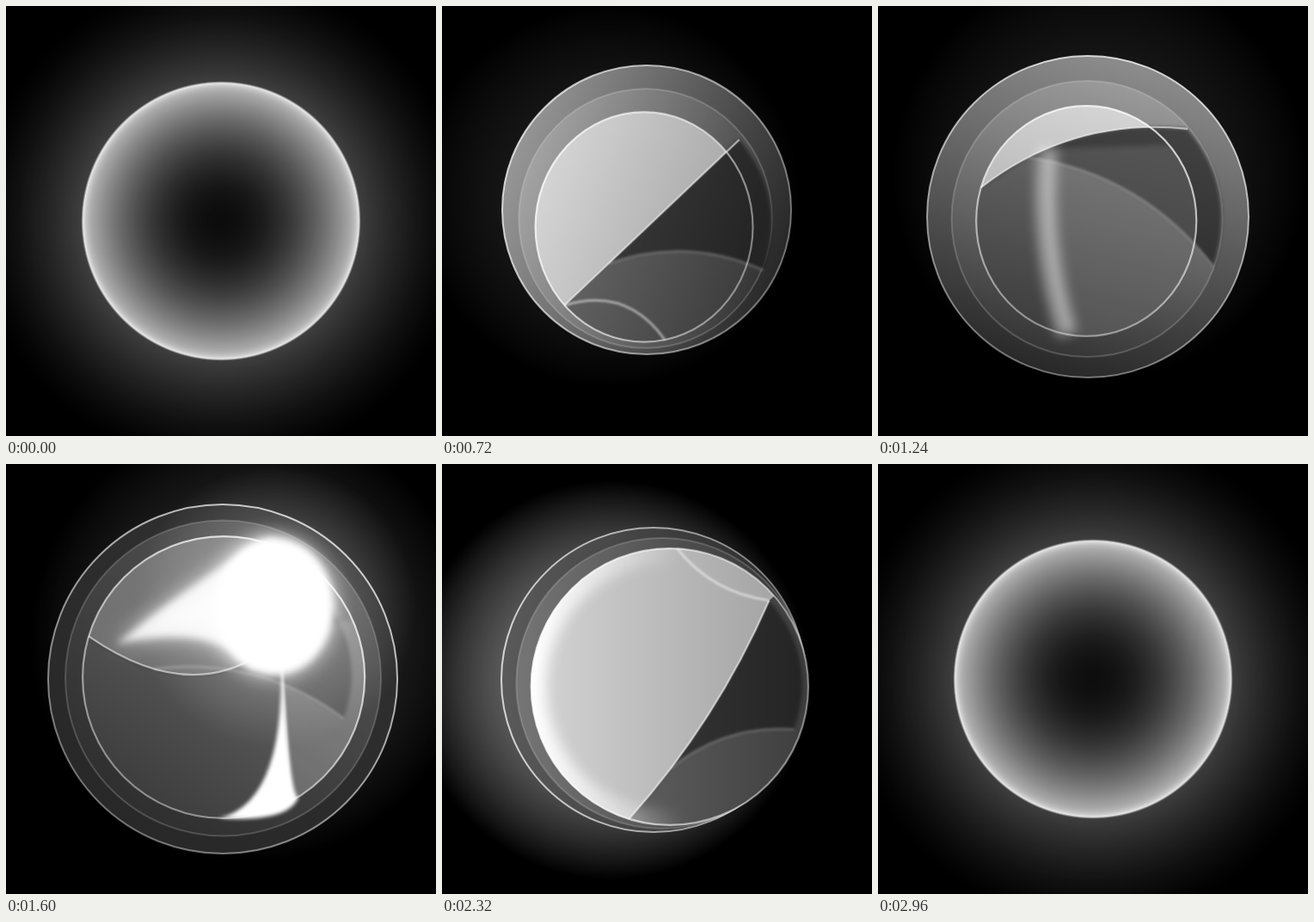
Recreate the animation shown at these times as an HTML page with a canvas. Size 500 by 500 pixels, loop 3 s.

```html
<!DOCTYPE html>
<html lang="en">
<head>
<meta charset="utf-8">
<title>Folding light</title>
<style>
  html, body { margin: 0; height: 100%; overflow: hidden; background: #000; }
  canvas { display: block; }
</style>
</head>
<body>
<canvas id="stage" width="500" height="500"></canvas>
<script>
const LOOP = 3000, STEP = 40, REST = 162;
const TIMES = [0, 720, 1240, 1600, 1920, 2320, 2960];
const g = document.getElementById('stage').getContext('2d');

const gray = v => `rgb(${v},${v},${v})`;
const light = v => `rgba(255,255,255,${v / 255})`;
const pulse = (t, center, width) => Math.exp(-(((t - center) / width) ** 2));

// Smooth curve through one value per key time.
function track(t, ...v) {
  const i = Math.max(1, TIMES.findIndex(k => k >= t));
  const span = TIMES[i] - TIMES[i - 1], u = (t - TIMES[i - 1]) / span;
  const slope = k => TIMES[k - 1] === undefined || TIMES[k + 1] === undefined ? 0 :
    (v[k + 1] - v[k - 1]) / (TIMES[k + 1] - TIMES[k - 1]) * span;
  const w = u * u * (3 - 2 * u);
  return v[i - 1] * (1 - w) + v[i] * w
    + slope(i - 1) * u * (1 - u) ** 2 - slope(i) * u * u * (1 - u);
}

// Geometry: a shell is { x, y, rx, ry }, a curve is three Bezier points.
const shell = (x, y, r, squash) => ({ x, y, rx: r + squash, ry: r - squash });

function at(d, degrees, reach = 1) {
  const a = degrees * Math.PI / 180;
  return [d.x + d.rx * reach * Math.cos(a), d.y + d.ry * reach * Math.sin(a)];
}

function bow(p, q, bend) {
  const dx = q[0] - p[0], dy = q[1] - p[1];
  return [p, [(p[0] + q[0]) / 2 - dy * bend, (p[1] + q[1]) / 2 + dx * bend], q];
}

const along = (curve, u) => [0, 1].map(k =>
  curve[0][k] * (1 - u) ** 2 + curve[1][k] * 2 * u * (1 - u) + curve[2][k] * u * u);

const outline = d =>
  `M${d.x - d.rx} ${d.y}a${d.rx} ${d.ry} 0 1 0 ${2 * d.rx} 0a${d.rx} ${d.ry} 0 1 0 ${-2 * d.rx} 0z`;
const curveTo = c => `Q${c[1]} ${c[2]}`;
const path = c => `M${c[0]}${curveTo(c)}`;

function fill(shape, style, blur = 0) {
  g.filter = blur ? `blur(${blur}px)` : 'none';
  g.fillStyle = style;
  g.fill(new Path2D(shape));
}

function line(shape, style, width = 2, blur = 0.7) {
  g.filter = `blur(${blur}px)`;
  g.lineWidth = width;
  g.strokeStyle = style;
  g.stroke(new Path2D(shape));
}

function inside(d, draw) {
  g.save();
  g.clip(new Path2D(outline(d)));
  draw();
  g.restore();
}

// Shade across a shell, brightest where it faces the lamp.
function shade(d, lamp, high, low, color = light, reach = 1) {
  const ramp = g.createLinearGradient(...at(d, lamp), ...at(d, lamp + 180));
  ramp.addColorStop(0, color(high));
  ramp.addColorStop(reach, color(low));
  return ramp;
}

function radial(x, y, r, level) {
  const ramp = g.createRadialGradient(x, y, 0, x, y, r), n = 120;
  for (let i = 0; i <= n; i++) ramp.addColorStop(i / n, light(level(r * i / n)));
  fill(`M0 0H500V500H0z`, ramp);
}

function flare(d, lamp, strength, width, blur) {
  if (strength < 0.02) return;
  inside(d, () => line(outline(d), shade(d, lamp, 255 * strength, 0, light, 0.55), width, blur));
}

function halo(d) {
  radial(d.x, d.y, d.rx + 125, r => {
    const k = r / d.rx;
    return k <= 1 ? Math.min(255, 12 + 180 * k * k + 70 * k ** 45)
      : 62 * Math.max(0, 1 - (r - d.rx) / 125) ** 1.4;
  });
}

function burstOut(d, lamp, strength, tip, lens) {
  if (strength < 0.02) return;
  const [x, y] = at(d, lamp, 0.62);
  const core = shell(x, y, 73, -6);
  const cone = `M${tip}Q${at(core, 215, 1.15)} ${at(core, 270)}L${at(core, 110)}Q${at(core, 170, 1.1)} ${tip}z`;
  const [top, , foot] = lens;
  const left = at(d, 92), right = at(d, 58);
  const wedge = `M${top}Q${foot} ${left}Q${foot[0]} ${left[1] + 5} ${right}Q${foot} ${top}z`;
  g.globalAlpha = strength;
  radial(x, y, d.rx, r => 95 * (1 - r / d.rx));
  for (const blur of [13, 4]) {
    fill(outline(core), '#fff', blur);
    fill(cone, light(210), blur);
  }
  fill(wedge, '#fff', 2);
  g.globalAlpha = 1;
}

function folds(t, outer) {
  const turn = 2 * Math.PI * t / LOOP;
  const inner = shell(250 - 15 * Math.sin(turn),
    track(t, 250, 257, 250, 248, 270, 259, 250),
    track(t, REST, 130, 131, 164, 148, 161, REST),
    5 * pulse(t, 1920, 200) - 5 * pulse(t, 950, 400));
  const mid = {};
  for (const k in inner) mid[k] = (inner[k] + outer[k]) / 2;

  const lamp = track(t, -190, -160, -75, -54, 0, 180, 190);
  const burst = pulse(t, 1600, 150);
  const reach = track(t, 1, 1.16, 1.22, 0.9, 0.8, 0.95, 1);

  // The fold cuts the inner shell; the veil and the lens hang from it.
  const from = 57 + 145 * Math.sin(Math.PI * (t + 80) / LOOP) ** 2;
  const to = -41, veilEnd = to + 60;
  const fold = bow(at(inner, from), at(inner, to, reach), track(t, 0, 0, -0.2, 0.5, -0.25, 0.08, 0));
  const veil = bow(at(inner, veilEnd, reach), along(fold, 0.25), 0.2);
  const lens = bow(along(fold, track(t, 0, 0, 0.35, 0.8, 0.75, 1, 1)),
    at(inner, track(t, 79, 79, 100, 62, 56, -87, -87)),
    track(t, 0, -0.36, 0.1, 0, 0.45, -0.2, 0));

  const [gx, gy] = at(outer, lamp, 0.28), glow = track(t, 0, 30, 30, 45, 190, 125, 0);
  radial(gx, gy, outer.rx + 55, r => glow * (1 - (r / (outer.rx + 55)) ** 2));

  fill(outline(outer), shade(outer, lamp, track(t, 60, 150, 140, 48, 118, 90, 60), 40, gray));
  fill(outline(mid), shade(mid, lamp, 45, 8));
  line(outline(mid), light(45));
  flare(outer, lamp + 15, pulse(t, 1920, 150), 48, 3);
  line(outline(outer), shade(outer, lamp, 190, 100));

  fill(outline(inner), shade(inner, lamp, 112, 62, gray));
  const pocket = `${path(fold)}Q${at(inner, to + 30, reach / Math.cos(Math.PI / 6))} ${veil[0]}${curveTo(veil)}z`;
  fill(pocket, shade(inner, lamp, 66, 36, gray), 2);

  const far = [to, (from + to) / 2 + 180, from].map(a => at(inner, a, 3));
  inside(inner, () => {
    const rightSide = `${path(lens)}L${at(inner, 40, 2)} ${at(inner, -20, 2)}z`;
    fill(rightSide, light(50 * pulse(t, 1500, 350)), 3);
    fill(`${path(fold)}L${far.join(' ')}z`,
      shade(inner, lamp, 212 - 90 * burst, 158 - 50 * burst, gray), 0.6);
  });
  flare(inner, lamp, pulse(t, 2320, 180), 34, 8);

  const band = pulse(t, 1240, 180);
  line(path(veil), light(55), 3, 1.5);
  line(path(lens), light(120), 3 + 20 * band, 1 + 6 * band);
  line(outline(inner), shade(inner, lamp, 200, 110), 2.2);
  line(path(fold), light(140), 2.2);
  burstOut(inner, lamp, burst, at(inner, from, 0.8), lens);
}

function frame() {
  const t = Math.floor(performance.now() % LOOP / STEP) * STEP;
  const outer = shell(track(t, 250, 238, 244, 252, 260, 246, 250),
    track(t, 250, 237, 245, 250, 251, 251, 250),
    track(t, REST, 168, 187, 203, 184, 177, REST),
    5 * pulse(t, 1920, 150));
  const u = Math.min(1, Math.sin(Math.PI * t / LOOP) / 0.65);
  const calm = 1 - u * u * (3 - 2 * u);

  fill('M0 0H500V500H0z', '#000');
  if (calm < 1) folds(t, outer);
  if (calm > 0) {
    fill('M0 0H500V500H0z', `rgba(0,0,0,${calm})`);
    g.globalCompositeOperation = 'lighter';
    g.globalAlpha = calm;
    halo(outer);
    g.globalAlpha = 1;
    g.globalCompositeOperation = 'source-over';
  }
  requestAnimationFrame(frame);
}
frame();
</script>
</body>
</html>
```
